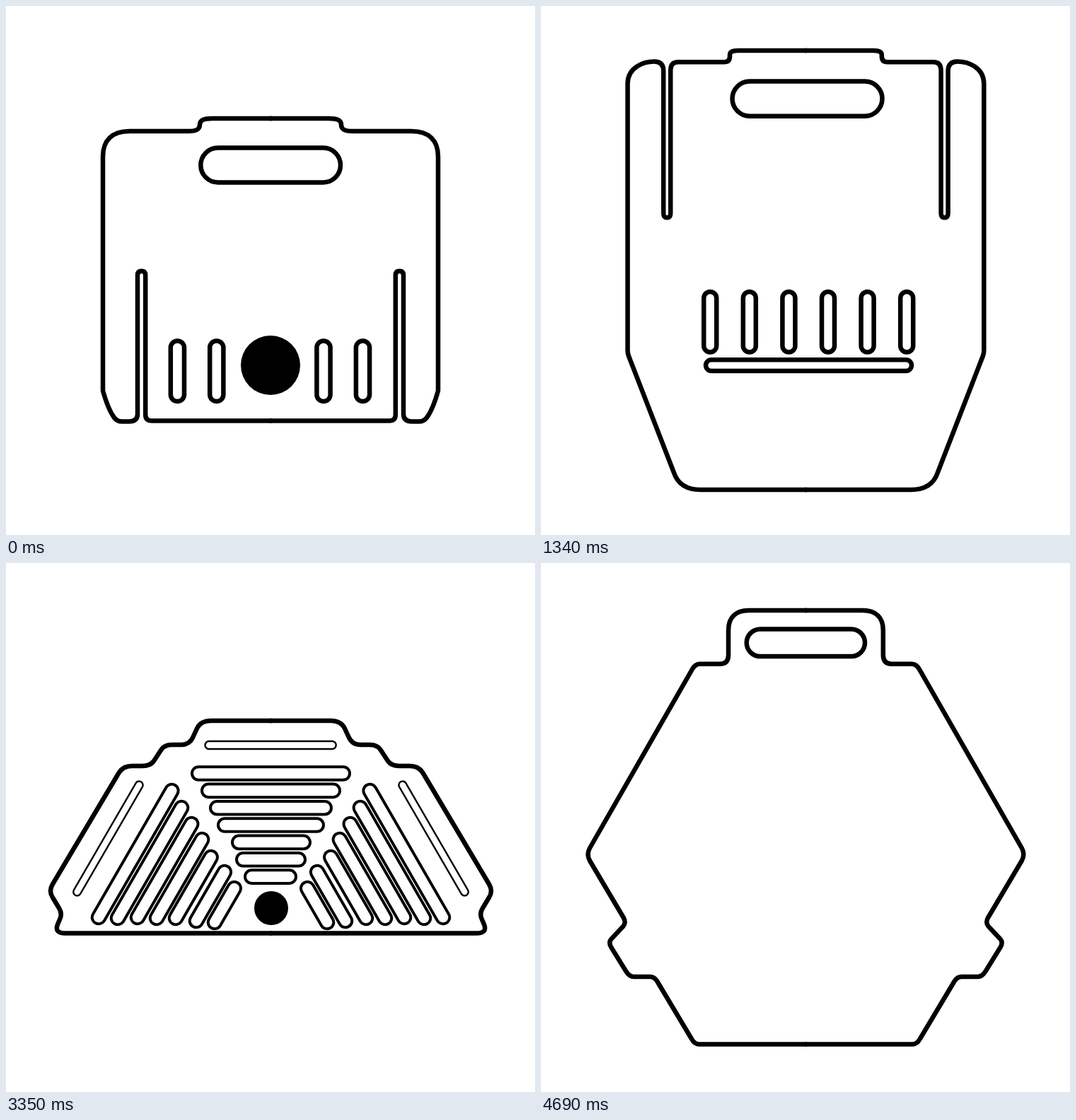
An HTML page for the animation above (5.36 s loop, 748 by 748 pixels).

```html
<!DOCTYPE html>
<html lang="en">
<head>
<meta charset="utf-8">
<title>Panel outlines</title>
<style>
  html, body { margin: 0; width: 100%; height: 100%; overflow: hidden; background: #fff; }
  svg { display: block; width: 100vw; height: 100vh; }
</style>
</head>
<body>
<svg id="stage" viewBox="0 0 748 748" fill="none" stroke="#000" stroke-linejoin="round"></svg>
<script>
const HOLD = 670;
const LINE = 6.5;
const stage = document.getElementById('stage');

const mirror = (cx, body) => body + `<g transform="translate(${2 * cx} 0) scale(-1 1)">${body}</g>`;
const outline = (cx, d) => mirror(cx, `<path d="${d}" stroke-width="${LINE}"/>`);
const dot = (x, y, r) => `<circle cx="${x}" cy="${y}" r="${r}" fill="#000" stroke="none"/>`;

// Rounded box given by the centre line of its stroke
function box(x1, y1, x2, y2, sw = LINE) {
  const w = x2 - x1, h = y2 - y1;
  return `<rect x="${x1}" y="${y1}" width="${w}" height="${h}" rx="${Math.min(w, h) / 2}" stroke-width="${sw}"/>`;
}

// Hollow slanted bar between two cap centres
function bar(x1, y1, x2, y2, w, sw) {
  const d = `M${x1} ${y1}L${x2} ${y2}`;
  return `<g stroke-linecap="round"><path d="${d}" stroke-width="${w}"/>` +
    `<path d="${d}" stroke="#fff" stroke-width="${w - 2 * sw}"/></g>`;
}

function frontPanel() {
  const slots = [242.4, 297.8, 449, 504.5].map(x => box(x - 9.6, 473.5, x + 9.6, 559)).join('');
  return outline(374, `M376 159H292C280 159 274 161 274 168S268 177 258 177H175
    C150 177 137 190 137 213V544C142 562 147 574 153 582Q157 587.5 164 587.5H174
    Q186 587.5 186 577V380.5Q186 374.7 191.6 374.7Q197.2 374.7 197.2 380.5V578Q197.2 586.5 206 586.5H376`) +
    box(275.3, 200.5, 473, 249.5) + slots + dot(374, 508, 42);
}

function tallPanel(x, y, barX1, barX2) {
  let slots = '';
  for (let i = 0; i < 6; i++) {
    const cx = x + i * 55.6;
    slots += box(cx - 9, y, cx + 9, y + 85.5);
  }
  return outline(374.4, `M376 63H279Q267 63 267 69V71Q267 79.3 259 79.3H194Q183.2 79.3 183.2 91V293
    Q183.2 299.3 178.2 299.3Q173.2 299.3 173.2 293V92Q173.2 78.5 160 78.5
    C146 78.5 122.5 86 122.5 110V487Q122.5 491 124 495L188 660Q196 684 226 684H376`) +
    box(270.5, 106.5, 482.5, 155.7) + slots + box(barX1, y + 96.2, barX2, y + 112);
}

const ROWS = [[261, 488], [275, 474], [287, 462], [298, 451], [318, 432], [324, 425], [336, 412]];
// Lower cap centre and height of each slanted bar
const SLANTS = [[131, 501, 179], [158, 502, 156], [186, 501, 132], [213, 502, 111],
  [240, 502, 86], [269, 506, 69], [295, 508, 48]];

function ventPanel(dx) {
  const rows = ROWS.map(([a, b], i) => {
    const y = 297.5 + i * 24.35;
    return box(a + 2, y - 9.3, b - 2, y + 9.3, 4);
  }).join('');
  const slants = SLANTS.map(([x, y, h]) => bar(x, y, x + h / Math.sqrt(3), y - h, 22.5, 4)).join('');
  return `<g transform="translate(${dx} 0)">` +
    outline(374.5, `M376 223H290Q276 223 270.5 233L264 247Q259 257 248 257H235Q224 257 219.5 264L209 280
      Q204 287 193 287H178Q166 287 160 296L66 454Q60 464 66 473L75 488Q80 496 76 504L73 511
      Q68 523.5 84 523.5H376`) +
    mirror(374.5, slants + bar(100.6, 465, 188.2, 314, 13.2, 2.4)) +
    box(281.5, 252, 466.7, 263, 2.4) + rows + dot(375, 488, 24) + '</g>';
}

function hexPanel() {
  return outline(374.4, `M376 67H294C275 67 265 77 265 95V130Q265 142.7 253 142.7H225Q218 142.7 214 150L69 403
    Q64 412 69 421L117 502Q120.5 509 116 514L100 531Q95 536 99 543L120 577Q125 585 131 585H154
    Q160 585 164 591L213 673Q217 680.5 224 680.5H376`) +
    box(290.7, 93.5, 458, 132);
}

const front = frontPanel();
const scenes = [
  front,
  front,
  tallPanel(239.2, 404, 233, 524),
  tallPanel(238.3, 403, 279, 476),
  tallPanel(237.6, 402.2, 325.3, 428.5),
  ventPanel(0),
  ventPanel(0.5),
  hexPanel()
];

let shown = -1;
function draw(t) {
  const i = Math.floor(t / HOLD) % scenes.length;
  if (i !== shown) {
    stage.innerHTML = scenes[i];
    shown = i;
  }
}

const start = performance.now();
function tick() {
  draw(performance.now() - start);
  requestAnimationFrame(tick);
}
tick();
</script>
</body>
</html>
```
